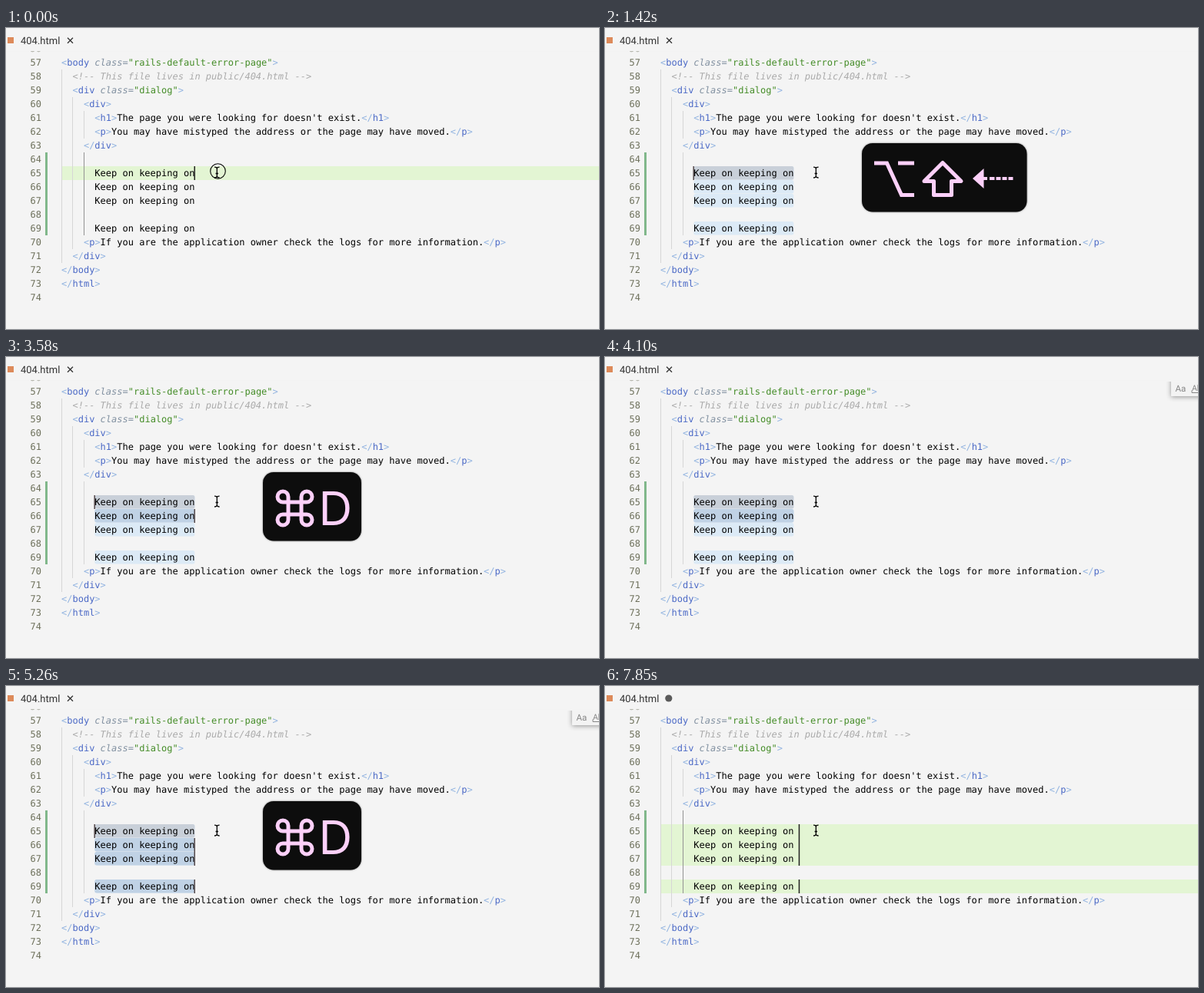
An HTML page for the animation above (8000 ms loop, 771 px wide and 392 px high).

```html
<!DOCTYPE html>
<html lang="en">
<head>
<meta charset="utf-8">
<title>Multiple cursors in an editor</title>
<style>
  html, body { margin: 0; width: 771px; height: 392px; overflow: hidden; background: #f4f4f4; }
  svg { display: block; }
  text { white-space: pre; text-rendering: geometricPrecision; }
  .code { font: 12px "DejaVu Sans Mono", monospace; fill: #000; }
  .num { fill: #6d705b; }
  .punct { fill: #91b3e0; }
  .tag { fill: #4b69c6; }
  .attr { fill: #8190a0; font-style: italic; }
  .str { fill: #448c27; }
  .note { fill: #aaa; font-style: italic; }
  .ui { font-family: Roboto, "Liberation Sans", sans-serif; }
  .glyphs { fill: none; stroke: #fdd0f9; stroke-width: 5; }
  .glyphs .solid { fill: #fdd0f9; stroke: none; }
</style>
</head>
<body>
<svg width="771" height="392" viewBox="0 0 771 392">
  <defs>
    <filter id="soft" x="-20%" y="-20%" width="140%" height="140%">
      <feDropShadow dx="0" dy="0" stdDeviation="1.2" flood-color="#000" flood-opacity=".5"/>
    </filter>
    <filter id="lift" x="-50%" y="-50%" width="200%" height="200%">
      <feDropShadow dx="0" dy="1" stdDeviation="3" flood-color="#000" flood-opacity=".4"/>
    </filter>
    <clipPath id="pane"><rect y="32" width="771" height="360"/></clipPath>
  </defs>
  <rect width="771" height="392" fill="#f4f4f4"/>
  <g id="rows"></g>
  <g id="guides"></g>
  <g id="marks"></g>
  <rect x="51" y="162" width="3" height="108" fill="#81b88b"/>
  <g id="code"></g>
  <g id="carets"></g>

  <g fill="none" stroke="#000">
    <circle id="click" cx="275.5" cy="186.5" r="9.8" stroke-width="1.1"/>
    <path d="M271 181.2q3 0 3.3 1.8q.3-1.8 3.3-1.8M274.3 182.5v11.2M271 195q3 0 3.3-1.8q.3 1.8 3.3 1.8M272.6 189.5h3.4" stroke-width="1.3"/>
  </g>

  <g id="finder" clip-path="url(#pane)">
    <rect x="736" y="24" width="60" height="27" fill="#f3f3f3" filter="url(#lift)"/>
    <g class="ui" fill="#858585">
      <text x="741.5" y="45" font-size="11.5">Aa</text>
      <text x="763" y="44" font-size="10.5">Ab</text>
    </g>
    <path d="M763 43.5v3h8" fill="none" stroke="#858585"/>
  </g>

  <rect width="771" height="30.5" fill="#f4f4f4"/>
  <rect x="2" y="12" width="8" height="8" fill="#dd8a5a"/>
  <text class="ui" x="19" y="20.5" font-size="13" fill="#333">404.html</text>
  <path id="close" d="M80 12.7l7 7m0-7l-7 7" stroke="#333" stroke-width="1.3"/>
  <circle id="dirty" cx="82.8" cy="16" r="4.6" fill="#5a5a5a"/>

  <g id="panel">
    <rect id="plate" x="334" y="150" height="89.5" rx="14" fill="#0a0a0a" filter="url(#soft)"/>
    <g id="extend" class="glyphs">
      <path d="M350 176h16.5l19 41.5h16.5M381 176h21"/>
      <path d="M439 175.5l24 24h-12.5v18h-23v-18h-12.5z" stroke-linejoin="round"/>
      <path class="solid" d="M478 196l14.5-13v26z"/>
      <path d="M492 196h5M500 196h6.5M508.500 196h6M516.500 196h6M524.500 196h6" stroke-width="4"/>
    </g>
    <g id="next" class="glyphs">
      <path d="M367 189h17v16h-17zM367 189v-7a7 7 0 1 0-7 7zM384 189h7a7 7 0 1 0-7-7zM384 205v7a7 7 0 1 0 7-7zM367 205h-7a7 7 0 1 0 7 7z"/>
      <text class="solid" x="406.500" y="219" font-size="60.5" font-family="Inter, Roboto, sans-serif">D</text>
    </g>
  </g>
</svg>
<script>
const LOOP = 8000, FIRST = 57, ROW = 18, LEFT = 72, CHAR = 7.224;
const PHRASE = 'Keep on keeping on', START = 6, END = 24;
const ALL = [65, 66, 67, 69];

const keep = ' '.repeat(START) + PHRASE;
const lines = [
  '<body class="rails-default-error-page">',
  '  <!-- This file lives in public/404.html -->',
  '  <div class="dialog">',
  '    <div>',
  "      <h1>The page you were looking for doesn't exist.</h1>",
  '      <p>You may have mistyped the address or the page may have moved.</p>',
  '    </div>',
  '', keep, keep, keep, '', keep,
  '    <p>If you are the application owner check the logs for more information.</p>',
  '  </div>', '</body>', '</html>', ''
];

// Each step changes part of the state and holds until the next.
const steps = [
  [0, { click: 1, lit: [65], carets: [65], col: END, blink: 1, sel: [], word: '', hits: 0, panel: 0, keys: 'extend', finder: 0, dirty: 0 }],
  [80, { click: 0 }],
  [350, { lit: [], sel: [65], word: 'on', col: 22 }],
  [440, { panel: 1 }],
  [530, { hits: 1 }],
  [890, { panel: .92 }],
  [970, { panel: 0, blink: 0 }],
  [1420, { panel: 1, blink: 1, word: PHRASE, col: START }],
  [1870, { panel: .92 }],
  [1960, { panel: 0, blink: 0 }],
  [2410, { blink: 1 }],
  [2950, { blink: 0 }],
  [3400, { blink: 1 }],
  [3580, { panel: 1, keys: 'next', sel: [65, 66], carets: [65, 66] }],
  [3660, { finder: 1 }],
  [4020, { panel: .92 }],
  [4100, { panel: 0, blink: 0 }],
  [4460, { panel: 1, blink: 1, sel: [65, 66, 67], carets: [65, 66, 67] }],
  [4900, { panel: .92 }],
  [4990, { panel: 0, blink: 0 }],
  [5260, { panel: 1, blink: 1, sel: ALL, carets: ALL }],
  [5700, { panel: .92 }],
  [5790, { panel: 0, blink: 0 }],
  [6240, { blink: 1 }],
  [6320, { lit: ALL, sel: [], word: '', hits: 0, col: END }],
  [6770, { blink: 0 }],
  [7220, { blink: 1 }],
  [7310, { finder: 0 }],
  [7850, { col: END + 1, dirty: 1 }]
];

const $ = id => document.getElementById(id);
const rowTop = line => 36 + (line - FIRST) * ROW;
const colX = col => LEFT + col * CHAR;
const box = (x, y, w, h, fill, r = 0) =>
  `<rect x="${x}" y="${y}" width="${w}" height="${h}" rx="${r}" fill="${fill}"/>`;
const escape = s => s.replace(/&/g, '&amp;').replace(/</g, '&lt;');
const span = (kind, s) => `<tspan class="${kind}">${escape(s)}</tspan>`;

function paint(line) {
  const token = /(<!--.*-->)|(<\/?)(\w+)|( \w+=)(".*?")|(>)|([^<>]+?(?= \w+="|<|$))/g;
  return line.replace(token, (all, note, open, name, attr, str, close) =>
    note ? span('note', note)
      : open ? span('punct', open) + span('tag', name)
      : attr ? span('attr', attr) + span('str', str)
      : close ? span('punct', close)
      : escape(all));
}

function drawCode() {
  const number = n => `<text class="code num" x="31.5" y="${rowTop(n) + 13}">${n}</text>`;
  $('code').innerHTML = number(FIRST - 1) + lines.map((line, i) => {
    const n = FIRST + i;
    return number(n) + `<text class="code" x="${LEFT}" y="${rowTop(n) + 13}">${paint(line)}</text>`;
  }).join('');
}

function drawGuides(active) {
  const guide = (x, from, to, fill = '#d6d6d6') =>
    box(x, rowTop(from), 1, (to - from + 1) * ROW, fill);
  $('guides').innerHTML = guide(72, 58, 71) + guide(86, 60, 70) + guide(101, 61, 62)
    + guide(101, 64, 69, active ? '#939393' : '#d6d6d6');
}

function drawMarks({ word, hits, sel }) {
  const mark = (line, col, fill) => box(colX(col), rowTop(line), word.length * CHAR, ROW - .4, fill, 2.5);
  let out = '';
  if (hits) lines.forEach((text, i) => {
    for (let c = text.indexOf(word); c >= 0; c = text.indexOf(word, c + 1))
      out += mark(FIRST + i, c, '#dceaf6');
  });
  for (const line of sel)
    out += mark(line, END - word.length, line === 65 ? '#c9d0d9' : '#c0d2e5');
  $('marks').innerHTML = out;
}

function show(id, opacity) {
  $(id).style.opacity = opacity;
}

function render(s) {
  $('rows').innerHTML = s.lit.map(n => box(LEFT, rowTop(n), 771 - LEFT, ROW, '#e3f5d3')).join('');
  drawGuides(s.lit.length);
  drawMarks(s);
  $('carets').innerHTML = !s.blink ? '' : s.carets.map(n => {
    const col = s.sel.length && n !== 65 ? END : s.col;
    return box(colX(col) - .9, rowTop(n), 1.5, ROW, s.lit.length ? '#222' : '#54494b');
  }).join('');
  show('click', s.click);
  show('finder', s.finder);
  show('dirty', s.dirty);
  show('close', 1 - s.dirty);
  show('panel', s.panel);
  for (const id of ['extend', 'next'])
    show(id, s.keys !== id ? 0 : s.panel < 1 ? .82 : 1);
  $('plate').setAttribute('width', s.keys === 'next' ? 128 : 214.5);
}

let shown = 0;
function tick() {
  const t = performance.now() % LOOP;
  const past = steps.filter(([at]) => at <= t);
  if (past.length !== shown) {
    shown = past.length;
    render(Object.assign({}, ...past.map(([, change]) => change)));
  }
  requestAnimationFrame(tick);
}

drawCode();
tick();
</script>
</body>
</html>
```
